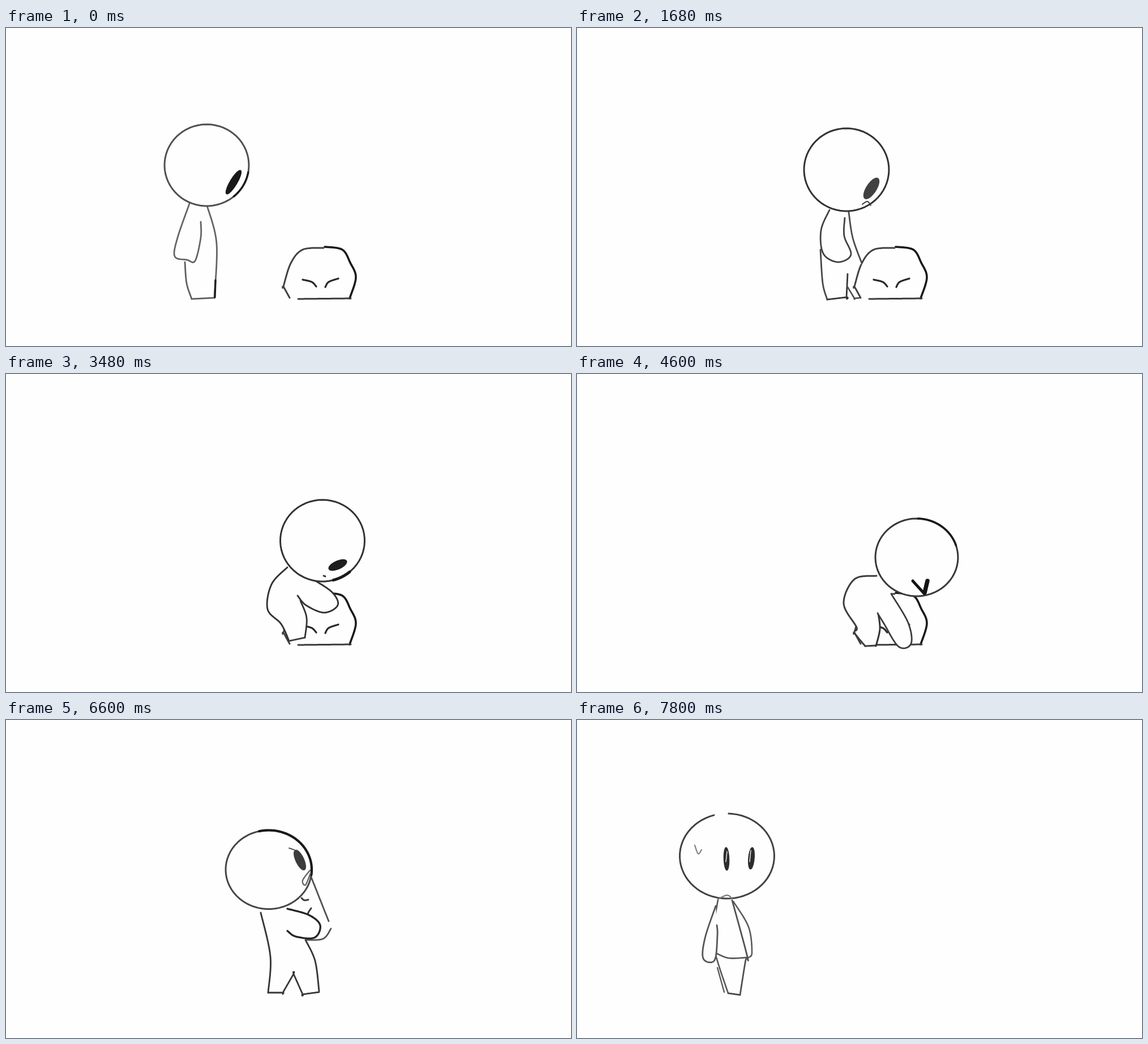
These frames come from a looping animation (998 px wide and 561 px high, 8000 ms). An HTML page with a canvas:

```html
<!DOCTYPE html>
<html lang="en">
<head>
<meta charset="utf-8">
<title>Lifting the rock</title>
<style>
html, body { margin: 0; width: 100%; height: 100%; overflow: hidden; background: #fefefe; }
canvas { display: block; }
</style>
</head>
<body>
<canvas id="stage" width="998" height="561"></canvas>
<script>
const ctx = document.getElementById('stage').getContext('2d');
const LOOP = 8000, SAMPLES = 64, GROUND = 480, PAPER = '#fefefe';
const mix = (a, b, u) => a + (b - a) * u;
const rad = deg => deg * Math.PI / 180;

// Catmull-Rom value between b and c
const spline = (a, b, c, d, t) =>
  b + t / 2 * (c - a + t * (2 * a - 5 * b + 4 * c - d + t * (3 * (b - c) + d - a)));

// Smooth stroke through "x,y" points (a doubled point is a corner), resampled evenly
function stroke(gray, width, text) {
  const p = text.split(' ').map(s => s.split(',').map(Number));
  const at = i => p[Math.min(Math.max(i, 0), p.length - 1)];
  const fine = [], len = [0];
  for (let s = 0; s <= (p.length - 1) * 10; s++) {
    const i = Math.floor(s / 10), t = s % 10 / 10;
    fine.push([0, 1].map(j => spline(at(i - 1)[j], at(i)[j], at(i + 1)[j], at(i + 2)[j], t)));
    if (s) len.push(len[s - 1] + Math.hypot(fine[s][0] - fine[s - 1][0], fine[s][1] - fine[s - 1][1]));
  }
  const pts = [];
  for (let n = 0, i = 1; n < SAMPLES; n++) {
    const goal = len[len.length - 1] * n / (SAMPLES - 1);
    while (i < fine.length - 1 && len[i] < goal) i++;
    const u = (goal - len[i - 1]) / (len[i] - len[i - 1] || 1);
    pts.push([0, 1].map(j => mix(fine[i - 1][j], fine[i][j], u)));
  }
  return { gray, width, pts };
}

function arc(gray, width, cx, cy, rx, ry, from = -90, to = 270, tilt = 0) {
  const c = Math.cos(rad(tilt)), s = Math.sin(rad(tilt));
  const pts = Array.from({ length: SAMPLES }, (_, i) => {
    const a = rad(mix(from, to, i / (SAMPLES - 1)));
    const x = rx * Math.cos(a), y = ry * Math.sin(a);
    return [cx + x * c - y * s, cy + x * s + y * c];
  });
  return { gray, width, pts };
}

const eye = (gray, cx, cy, long, thin, tilt) =>
  ({ ...arc(gray, 1.5, cx, cy, long, thin, -90, 270, tilt), solid: true });

// Head circle, with an optional heavier arc drawn along it
function skull(gray, cx, cy, rx, ry, heavy, from, to) {
  const parts = { head: arc(gray, 3, cx, cy, rx, ry) };
  if (heavy) parts.accent = arc(25, heavy, cx, cy, rx, ry, from, to);
  return parts;
}

const boulder = {
  rock: stroke(65, 3, '501,476 490,456 490,456 503,415 524,391 561,388'),
  rockR: stroke(25, 3.6, '563,386 594,391 608,414 618,440 607,477'),
  rockB: stroke(60, 3, '516,478 609,477'),
  browL: stroke(40, 3.2, '524,444 540,448 548,456'),
  browR: stroke(40, 3.2, '564,457 570,448 587,442')
};

const stand = {
  ...boulder,
  ...skull(80, 354.5, 242, 74.5, 72, 3.4, 10, 50),
  eyeA: eye(25, 402, 272, 24, 6, -59),
  back: stroke(95, 2.8, '316,413 319,450 328,478'),
  base: stroke(95, 2.8, '328,478 368,476'),
  front: stroke(100, 2.8, '355,313 372,380 368,476'),
  heel: stroke(30, 3.4, '370,445 369,475'),
  arm: stroke(100, 2.8, '324,310 303,370 298,403 320,409 334,411 344,370 344,342')
};

const near = {
  ...boulder,
  ...skull(50, 476, 250, 75, 73),
  eyeA: eye(65, 520, 283, 21, 8.5, -57),
  mouth: stroke(60, 2, '504,311 513,306 519,313'),
  back: stroke(70, 2.8, '430,391 434,450 442,479'),
  base: stroke(55, 2.8, '442,479 476,475 476,475 478,434'),
  front: stroke(75, 2.8, '480,325 487,370 503,415'),
  leg: stroke(75, 2.6, '478,457 490,477 490,477 500,476'),
  arm: stroke(65, 2.8, '446,321 431,357 435,398 461,413 484,400 472,367 473,335')
};

const reach = {
  ...boulder,
  ...skull(50, 559, 294, 74.5, 72, 5, 75, 50),
  eyeA: eye(30, 586, 337, 17, 7, -24),
  mouth: stroke(40, 2.8, '561,356 564,357'),
  back: stroke(50, 2.9, '497,341 469,371 462,415 486,441 500,471'),
  base: stroke(60, 2.8, '500,471 528,465'),
  front: stroke(50, 2.8, '520,400 531,430 528,465'),
  arm: stroke(50, 2.9, '508,345 545,364 577,386 586,408 562,421 530,408 515,391')
};

const grip = {
  ...boulder,
  ...skull(55, 600, 323.5, 73, 68.5, 3.6, -88, -18),
  squintA: stroke(20, 5, '593,365 613,387'),
  squintB: stroke(20, 7.5, '619,365 614,386'),
  back: stroke(60, 3, '529,356 490,362 471,405 494,447 490,456 509,480'),
  base: stroke(60, 3, '509,480 528,479'),
  front: stroke(50, 3, '532,422 535,450 528,480'),
  arm: stroke(60, 2.8, '555,388 585,439 590,476 568,481 542,440 531,422')
};

const lift = {
  rockR: stroke(35, 3.8, '513,317 535,320 562,342'),
  rockB: stroke(70, 3.6, '562,342 547,388'),
  browR: stroke(50, 3, '522,348 520,360 526,374'),
  ...skull(70, 445, 299, 71, 67, 4.2, -122, -40),
  eyeA: eye(30, 447, 282, 19, 8, 63),
  eyeB: eye(15, 474, 265, 16, 8, 63),
  mouth: arc(110, 2.4, 473, 297, 13.5, 14),
  sweat: stroke(120, 2.2, '398,307 405,326 408,313'),
  markA: stroke(90, 2.2, '435,295 447,306'),
  markB: stroke(90, 2.2, '488,263 490,273'),
  back: stroke(55, 3, '439,372 454,400 461,446 458,478'),
  base: stroke(45, 3, '458,478 491,478 491,478 495,459 505,458 517,479 517,479 549,479'),
  belly: stroke(60, 2.6, '461,446 480,455 500,457'),
  front: stroke(60, 3, '528,427 547,445 549,479'),
  arm: stroke(55, 2.9, '484,361 525,375 558,399 556,425 533,424 499,400')
};

const hold = {
  rockR: stroke(80, 2.8, '539,277 570,355'),
  rockB: stroke(85, 2.8, '574,368 560,386 529,388'),
  browL: stroke(60, 3, '522,314 527,318 534,317'),
  browR: stroke(60, 3, '539,332 533,343 536,358'),
  ...skull(70, 464, 264, 76, 69.5, 4.2, -103, 8),
  eyeA: eye(60, 519, 247, 19, 7, 65),
  mouth: stroke(100, 2.4, '537,265 524,283 529,291 538,270'),
  markA: stroke(80, 2, '500,226 509,229'),
  back: stroke(55, 2.9, '450,340 467,417 463,481'),
  base: stroke(55, 2.8, '463,481 489,481 489,481 508,448 508,448 524,484 524,484 553,480'),
  front: stroke(55, 2.9, '529,388 546,425 553,478'),
  arm: stroke(35, 3.3, '497,333 535,344 555,362 545,384 512,382 497,372')
};

const toss = {
  ...hold,
  rock: stroke(70, 3, '539,277 502,330 529,388'),
  arm: stroke(50, 3, '497,333 550,300 575,270 560,325 505,368')
};

const idle = {
  head: arc(65, 3, 265, 240, 83.5, 75, -88, 254),
  eyeA: eye(45, 264, 245, 20, 4.5, 88),
  eyeB: eye(45, 308, 244, 19, 5, 95),
  glintA: stroke(245, 1.4, '265,232 263,250'),
  glintB: stroke(245, 1.4, '307,230 305,250'),
  sweat: stroke(130, 2.2, '208,221 214,236 220,229'),
  neck: stroke(120, 2.2, '249,316 265,309 274,315'),
  back: stroke(85, 2.6, '249,317 239,385 248,425 267,482'),
  base: stroke(70, 2.8, '267,482 288,485'),
  front: stroke(80, 2.8, '274,318 301,418 298,423 288,485'),
  belly: stroke(85, 2.6, '245,411 268,420 300,419'),
  leg: stroke(90, 2.4, '248,437 260,480'),
  arm: stroke(85, 2.8, '245,328 226,385 223,421 243,424 248,380 247,362'),
  armB: stroke(90, 2.6, '276,320 303,365 309,410 303,419')
};

// Key poses; dx moves all, lean and stretch grow with height, rock is the boulder's own shift
const key = (time, pose, { dx = 0, lean = 0, stretch = 0, rock = 0 } = {}) =>
  ({ time, pose, move: { dx, lean, stretch, rock } });
const keys = [
  key(0, stand), key(200, stand),
  key(480, stand, { dx: -20, lean: -17, stretch: -12 }),
  key(1000, stand, { dx: 12 }),
  key(1680, near), key(1840, near),
  key(2720, near, { lean: 36 }),
  key(3428, reach), key(3515, reach),
  key(4200, grip, { lean: 7 }),
  key(4540, grip), key(4640, grip),
  key(4840, grip, { lean: 15 }),
  key(5240, grip, { lean: -20, stretch: -32 }),
  key(5560, lift, { lean: 25, stretch: -30 }),
  key(5792, lift), key(5865, lift),
  key(6080, lift, { lean: -25, stretch: 6 }),
  key(6520, hold), key(6600, hold),
  key(6765, hold, { lean: -14, stretch: 12, rock: 14 }),
  key(6872, toss, { rock: -40 }),
  key(7040, toss, { lean: 10, rock: -420 }),
  key(7360, idle, { dx: 76, rock: -420 }),
  key(7800, idle), key(LOOP, idle)
];

// Bursts of redraws: start, end, count
const bursts = [
  [280, 1000, 9], [1120, 1680, 8], [1840, 2280, 6], [2440, 2720, 4], [3000, 3600, 8], [3800, 4200, 5],
  [4440, 5240, 9], [5320, 5560, 3], [5720, 6520, 12], [6600, 7360, 15], [7440, 7800, 5]
];

function stepTime(t) {
  const burst = bursts.filter(b => b[0] <= t).pop();
  if (!burst) return 0;
  const [from, to, count] = burst, gap = (to - from) / (count - 1);
  return Math.min(to, from + Math.floor((t - from) / gap + 1e-6) * gap);
}

function poseAt(t) {
  const i = keys.findIndex(k => k.time > t);
  const a = keys[i - 1], b = keys[i];
  const raw = (t - a.time) / (b.time - a.time), u = raw * raw * (3 - 2 * raw);
  const shift = name => mix(a.move[name], b.move[name], u);
  const dx = shift('dx'), lean = shift('lean'), stretch = shift('stretch'), rock = shift('rock');
  const place = (name, x, y) => {
    if (/^(rock|brow)/.test(name)) return [x, y + rock];
    const h = (GROUND - y) / 300;
    return [x + dx + lean * h, y + stretch * h];
  };
  const out = {};
  for (const name in { ...a.pose, ...b.pose }) {
    const p = a.pose[name], q = b.pose[name];
    if (!(u < 0.5 ? p : q)) continue;
    const from = p || q, to = q || p;
    out[name] = {
      gray: mix(from.gray, to.gray, u),
      width: mix(from.width, to.width, u),
      solid: from.solid,
      pts: from.pts.map(([x, y], k) => place(name, mix(x, to.pts[k][0], u), mix(y, to.pts[k][1], u)))
    };
  }
  return out;
}

function trace(pts) {
  ctx.beginPath();
  for (const [x, y] of pts) ctx.lineTo(x, y);
}

function blank(pts) {
  trace(pts);
  ctx.fillStyle = PAPER;
  ctx.fill();
}

function draw(t) {
  const pose = poseAt(stepTime(t));
  const ink = names => names.split(' ').forEach(name => {
    const part = pose[name];
    if (!part) return;
    const g = Math.round(part.gray);
    ctx.strokeStyle = ctx.fillStyle = `rgb(${g},${g},${g})`;
    ctx.lineWidth = part.width;
    trace(part.pts);
    if (part.solid) ctx.fill();
    ctx.stroke();
  });
  ctx.fillStyle = PAPER;
  ctx.fillRect(0, 0, 998, 561);
  ctx.lineCap = ctx.lineJoin = 'round';
  const { back, base, front, arm, head } = pose;
  ink('rock rockR rockB browL browR');
  blank([...back.pts, ...base.pts, ...[...front.pts].reverse(), arm.pts[0]]);
  ink('back base front belly leg heel');
  blank(arm.pts);
  ink('arm armB');
  blank(head.pts);
  ink('head accent eyeA eyeB glintA glintB squintA squintB mouth sweat markA markB neck');
}

const begin = performance.now();
function tick() {
  draw((performance.now() - begin) % LOOP);
  requestAnimationFrame(tick);
}
tick();
</script>
</body>
</html>
```
